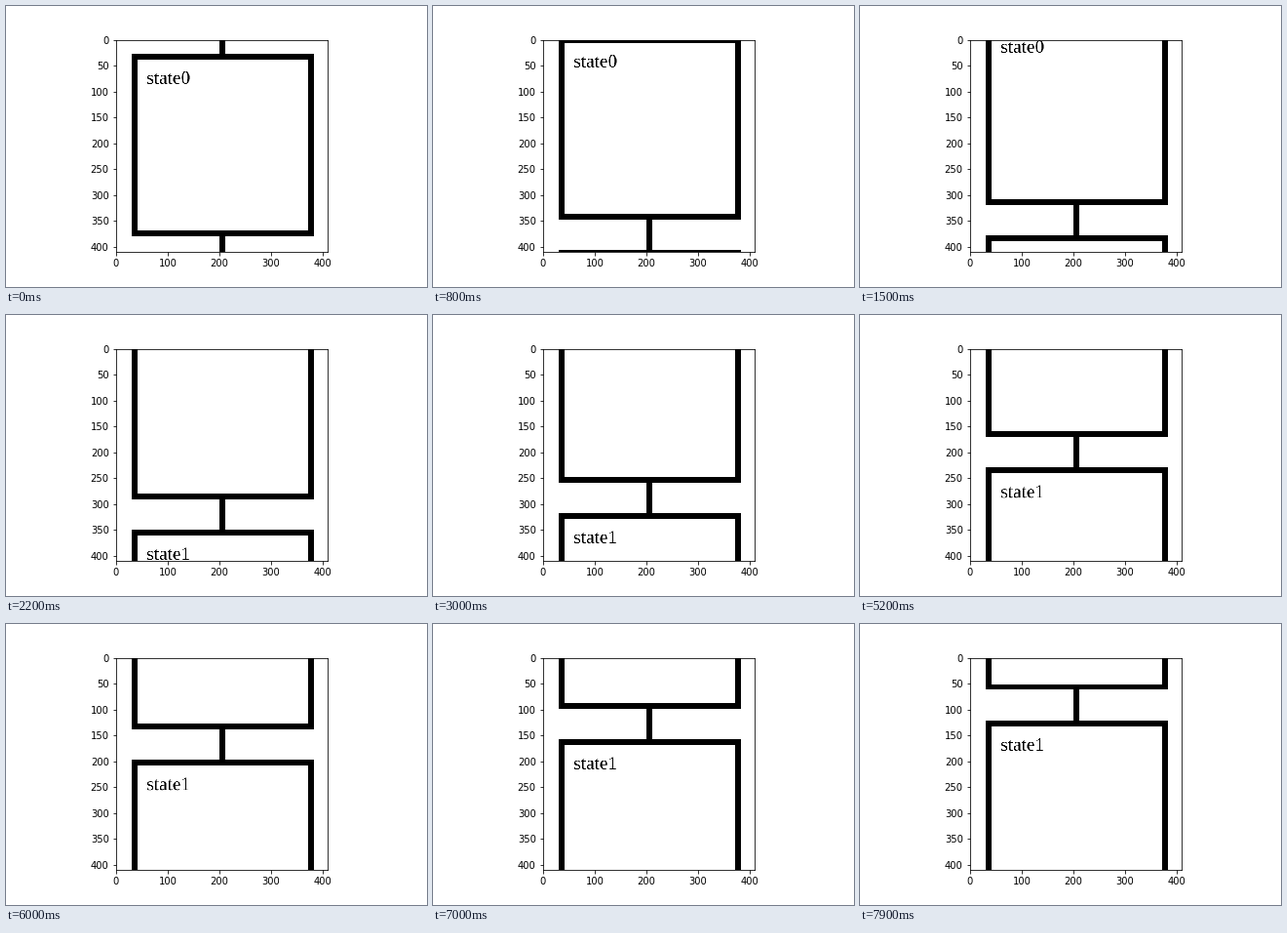
A matplotlib script that plays this animation: 432 by 288 pixels, repeating every 8000 ms.

```python
import numpy as np
import matplotlib.pyplot as plt
from matplotlib.animation import FuncAnimation
from matplotlib.path import Path
from matplotlib.textpath import TextPath

SIZE = 410      # side of one state tile, in image pixels
WALL = 11
SPEED = 4       # image pixels scrolled per frame
FRAMES = 80
INTERVAL = 100


def draw_label(tile, text, x, baseline, size=36, sub=4):
    """Rasterise text into the tile with sub x sub antialiasing."""
    outline = TextPath((0, 0), text, size=size, prop={"family": "Liberation Serif"})
    w, up, down = 100, 40, 10
    h = up + down
    gx, gy = np.meshgrid((np.arange(w * sub) + 0.5) / sub,
                         up - (np.arange(h * sub) + 0.5) / sub)
    points = np.column_stack([gx.ravel(), gy.ravel()])
    inside = np.zeros(len(points), bool)
    for poly in outline.to_polygons():
        inside ^= Path(poly).contains_points(points)
    cover = inside.reshape(h, sub, w, sub).mean(axis=(1, 3))
    tile[baseline - up:baseline + down, x:x + w] -= cover


def make_tile(text):
    tile = np.ones((SIZE, SIZE))
    left, right, top, bottom, mid = 30, 370, 28, 368, 200
    for x in (left, right):
        tile[top:bottom + WALL, x:x + WALL] = 0
    for y in (top, bottom):
        tile[y:y + WALL, left:right + WALL] = 0
    tile[:top, mid:mid + WALL] = 0
    tile[bottom:, mid:mid + WALL] = 0
    draw_label(tile, text, 59, 86)
    return tile


world = np.vstack([make_tile("state0"), make_tile("state1")])

plt.rcParams.update({"font.family": "DejaVu Sans", "font.size": 10})
fig, ax = plt.subplots(figsize=(6, 4), dpi=72)
fig.subplots_adjust(left=0.125, right=0.9, bottom=0.125, top=0.88)
image = ax.imshow(world[:SIZE], cmap="gray", vmin=0, vmax=1, interpolation="nearest")
ax.set_xticks(range(0, 401, 100))
ax.set_yticks(range(0, 401, 50))


def update(i):
    start = i * SPEED
    image.set_data(world[start:start + SIZE])
    return [image]


anim = FuncAnimation(fig, update, frames=FRAMES, interval=INTERVAL,
                     repeat=True, repeat_delay=0)
plt.show()
```
